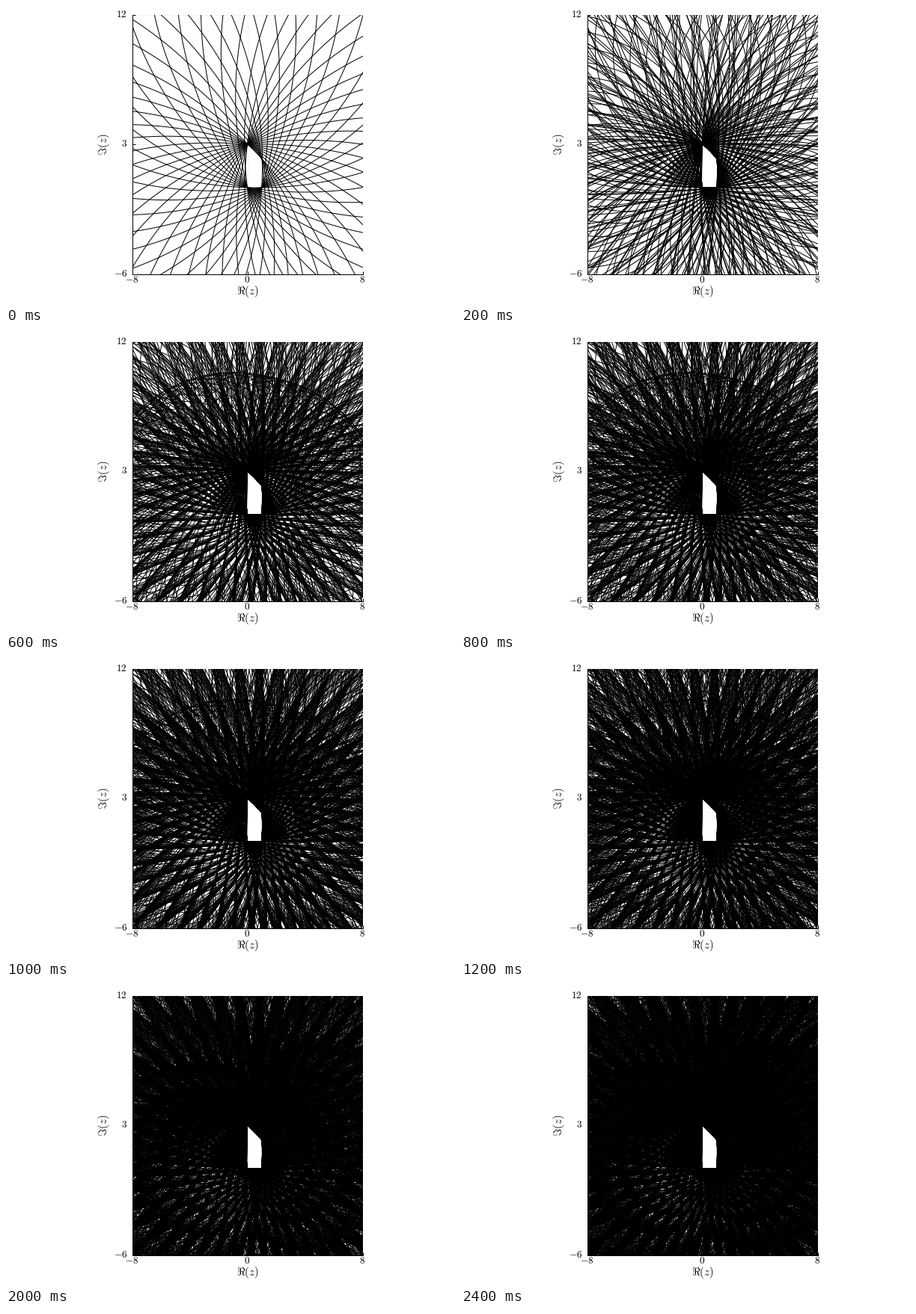
A matplotlib script that plays this animation: 600x400 px, repeating every 3.45 s.

```python
import numpy as np
import matplotlib.pyplot as plt
from matplotlib.animation import FuncAnimation
from matplotlib.collections import LineCollection

plt.rcParams["mathtext.fontset"] = "cm"

WIDTH, HEIGHT, DPI = 600, 400, 100
RINGS, FRAMES, STEP_MS = 49, 69, 50
CENTRES = 49
CORNERS = np.array([0, 1, 1 + 2j, 3j])
GOLDEN = (5 ** 0.5 - 1) / 2
PX = 72 / DPI


def ring_radius(k):
    """Radii scattered evenly over 0 to 100."""
    return 100 * ((0.25 + k * GOLDEN) % 1)


def enclosing_circles(rho):
    """Circles centred on a ring, each reaching its farthest corner."""
    centres = rho * np.exp(2j * np.pi * np.arange(CENTRES) / CENTRES)
    radii = np.abs(centres[:, None] - CORNERS).max(axis=1)
    turn = np.exp(1j * np.linspace(0, 2 * np.pi, 361))
    facing = -np.exp(1j * np.angle(centres))
    # Sample densely near the side that passes the corners.
    if rho > 15:
        turn = np.exp(1j * np.linspace(-20 / rho, 20 / rho, 81))
    z = centres[:, None] + (radii * facing)[:, None] * turn
    return list(np.stack([z.real, z.imag], axis=-1))


fig = plt.figure(figsize=(WIDTH / DPI, HEIGHT / DPI), dpi=DPI, facecolor="white")
ax = fig.add_axes([168.5 / WIDTH, 1 - 358.5 / HEIGHT, 308 / WIDTH, 347 / HEIGHT])
ax.set(xlim=(-8, 8), ylim=(-6, 12), xticks=[-8, 0, 8], yticks=[-6, 3, 12])
ax.set_xticklabels([])
ax.set_yticklabels([])
ax.grid(color="black", alpha=0.1, lw=0.5 * PX)
ax.set_axisbelow(True)
ax.tick_params(direction="in", length=4 * PX, width=PX)
for side in ("top", "right"):
    ax.spines[side].set_visible(False)
for side in ("left", "bottom"):
    ax.spines[side].set_linewidth(PX)


def label(x, y, text, size=13.3, **kw):
    fig.text(x / WIDTH, 1 - y / HEIGHT, text, fontsize=size * PX, **kw)


for x, text in ((168, "$-8$"), (322.5, "$0$"), (476.5, "$8$")):
    label(x, 366, text, ha="center", va="center")
for y, text in ((11.5, "$12$"), (185, "$3$"), (359, "$-6$")):
    label(162, y, text, ha="right", va="center")
label(322.5, 382, r"$\Re(z)$", 15, ha="center", va="center")
label(131, 185, r"$\Im(z)$", 15, ha="center", va="center", rotation=90)

rings = [enclosing_circles(ring_radius(k)) for k in range(RINGS)]
curves = LineCollection([], colors="black", linewidths=PX)
ax.add_collection(curves, autolim=False)


def draw(frame):
    shown = rings[:min(frame, RINGS - 1) + 1]
    curves.set_segments([c for ring in shown for c in ring])
    return [curves]


anim = FuncAnimation(fig, draw, frames=FRAMES, interval=STEP_MS, repeat=True)
plt.show()
```
